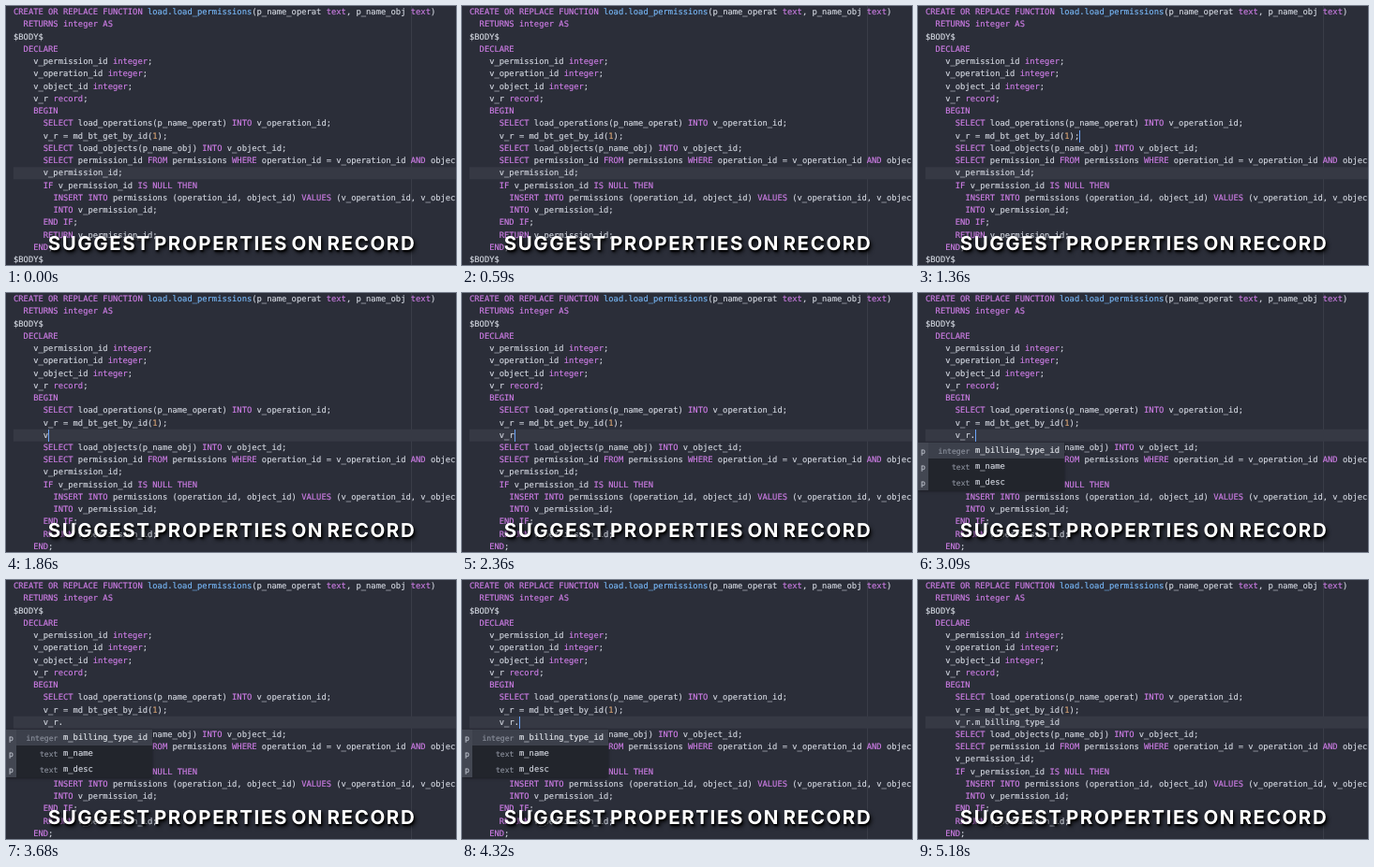
An HTML page that plays this animation: 480x277 px, repeating every 5.22 s.

```html
<!DOCTYPE html>
<html lang="en">
<head>
<meta charset="utf-8">
<title>Suggest properties on record</title>
<style>
:root { --c: 5.304px; --l: 13.25px; --y: 1px; --t: 5220ms step-end infinite; }
html, body { margin: 0; width: 100%; height: 100%; overflow: hidden; background: #2b2e39; }
#stage {
  position: relative; width: 480px; height: 277px; overflow: hidden;
  font: 8.81px/var(--l) "DejaVu Sans Mono", "Noto Sans Mono", monospace;
  color: #d3d7e0; -webkit-text-stroke: .15px; text-rendering: geometricPrecision; white-space: pre;
}
#stage > * { position: absolute; }
pre { margin: 0; font: inherit; left: 8px; top: var(--y); }
.kw { color: #ce7de6; }
.fn { color: #78b8f8; }
.num { color: #d6a273; }

#guide { left: 432px; top: 0; width: 1px; height: 277px; background: #3a3d48; }
#active { left: 8px; top: 0; width: 472px; height: var(--l); background: #363944; animation: active var(--t); }
#tail { top: calc(11 * var(--l) + var(--y)); animation: push var(--t); }
#typed {
  left: calc(8px + 6 * var(--c)); top: calc(11 * var(--l) + var(--y));
  height: var(--l); overflow: hidden; animation: type var(--t);
}
#caret { width: 1px; height: var(--l); background: #6ba3f7; animation: caret var(--t); }

@keyframes active {
  0% { transform: translateY(calc(13 * var(--l))); }
  26.92% { transform: translateY(calc(10 * var(--l))); }
  30.36%, 100% { transform: translateY(calc(11 * var(--l))); }
}
@keyframes push {
  0% { transform: none; }
  30.36%, 100% { transform: translateY(var(--l)); }
}
@keyframes type {
  0% { width: 0; }
  34.77% { width: var(--c); }
  40.8% { width: calc(2 * var(--c)); }
  44.35% { width: calc(3 * var(--c)); }
  56.42% { width: calc(4 * var(--c)); }
  83.43%, 100% { width: calc(21 * var(--c) + 1px); }
}
@keyframes caret {
  0% { opacity: 0; left: calc(8px + 31 * var(--c)); top: calc(10 * var(--l)); }
  25.96% { opacity: 1; left: calc(8px + 31 * var(--c)); top: calc(10 * var(--l)); }
  30.36% { opacity: 1; left: calc(8px + 6 * var(--c)); top: calc(11 * var(--l)); }
  34.77% { opacity: 1; left: calc(8px + 7 * var(--c)); top: calc(11 * var(--l)); }
  40.8% { opacity: 1; left: calc(8px + 8 * var(--c)); top: calc(11 * var(--l)); }
  44.35% { opacity: 1; left: calc(8px + 9 * var(--c)); top: calc(11 * var(--l)); }
  56.42% { opacity: 1; left: calc(8px + 10 * var(--c)); top: calc(11 * var(--l)); }
  67.05% { opacity: 0; left: calc(8px + 10 * var(--c)); top: calc(11 * var(--l)); }
  74.71% { opacity: 1; left: calc(8px + 10 * var(--c)); top: calc(11 * var(--l)); }
  83.43% { opacity: 1; left: calc(8px + 27 * var(--c)); top: calc(11 * var(--l)); }
  94.83%, 100% { opacity: 0; left: calc(8px + 27 * var(--c)); top: calc(11 * var(--l)); }
}

.menu { left: 0; top: 159.5px; width: 156px; background: #22252c; box-shadow: 0 1px 3px #0006; }
.menu div { position: relative; height: 17.2px; line-height: 18.8px; }
.menu div:first-child { background: #3c404b; color: #e4e7ed; }
.menu span { position: absolute; top: 0; }
.menu b { color: #fff; }
.menu .type { font-size: 8.1px; color: #8a8f9b; text-align: right; }
.menu .where { font-size: 8.1px; color: #8a8f9b; left: 127px; }
.menu .icon { width: 11px; height: 17.2px; text-align: center; font-size: 8.1px; background: #434752; color: #c3c7d1; }
#vars { animation: vars var(--t); }
#vars .type { left: 0; width: 34.5px; }
#vars .name { left: 40px; }
#props { animation: props var(--t); }
#props .type { left: 12px; width: 43.5px; }
#props .name { left: 61px; }
@keyframes vars {
  0% { opacity: 0; }
  47.8% { opacity: 1; }
  56.42%, 100% { opacity: 0; }
}
@keyframes props {
  0% { opacity: 0; }
  58.14% { opacity: 1; }
  83.43%, 100% { opacity: 0; }
}

#caption {
  left: 0; top: 240.5px; width: 482px; text-align: center;
  font: 700 20.5px/25px Inter, "Open Sans", sans-serif; letter-spacing: 1.6px; word-spacing: -3px;
  color: #fff; -webkit-text-stroke: 0; text-shadow: 1px 2px 2px #000, 2px 3px 4px #000c;
}
</style>
</head>
<body>
<div id="stage"><div id="guide"></div><div id="active"></div><pre id="head">CREATE OR REPLACE FUNCTION load.load_permissions(p_name_operat text, p_name_obj text)
  RETURNS integer AS
$BODY$
  DECLARE
    v_permission_id integer;
    v_operation_id integer;
    v_object_id integer;
    v_r record;
    BEGIN
      SELECT load_operations(p_name_operat) INTO v_operation_id;
      v_r = md_bt_get_by_id(1);</pre><pre id="tail">      SELECT load_objects(p_name_obj) INTO v_object_id;
      SELECT permission_id FROM permissions WHERE operation_id = v_operation_id AND object_id = v_object_id INTO
      v_permission_id;
      IF v_permission_id IS NULL THEN
        INSERT INTO permissions (operation_id, object_id) VALUES (v_operation_id, v_object_id) RETURNING permission_id
        INTO v_permission_id;
      END IF;
      RETURN v_permission_id;
    END;
$BODY$</pre><div id="typed">v_r.m_billing_type_id</div><div id="caret"></div><div id="vars" class="menu"><div><span class="type">integer</span><span class="name"><b>v_</b>pe<b>r</b>mission_id</span><span class="where">local</span></div><div><span class="type">integer</span><span class="name"><b>v_</b>ope<b>r</b>ation_id</span><span class="where">local</span></div></div><div id="props" class="menu"><div><span class="icon">p</span><span class="type">integer</span><span class="name">m_billing_type_id</span></div><div><span class="icon">p</span><span class="type">text</span><span class="name">m_name</span></div><div><span class="icon">p</span><span class="type">text</span><span class="name">m_desc</span></div></div><div id="caption">SUGGEST PROPERTIES ON RECORD</div></div>
<script>
// Static syntax colours; all motion is in the keyframes.
const tag = name => `<span class="${name}">$&</span>`;
for (const block of document.querySelectorAll('pre')) {
  block.innerHTML = block.textContent
    .replace(/(?<=FUNCTION )[\w.]+/, tag('fn'))
    .replace(/\b1\b/g, tag('num'))
    .replace(/(?<!\$)\b([A-Z]{2,}|integer|text|record)\b/g, tag('kw'));
}
</script>
</body>
</html>
```
